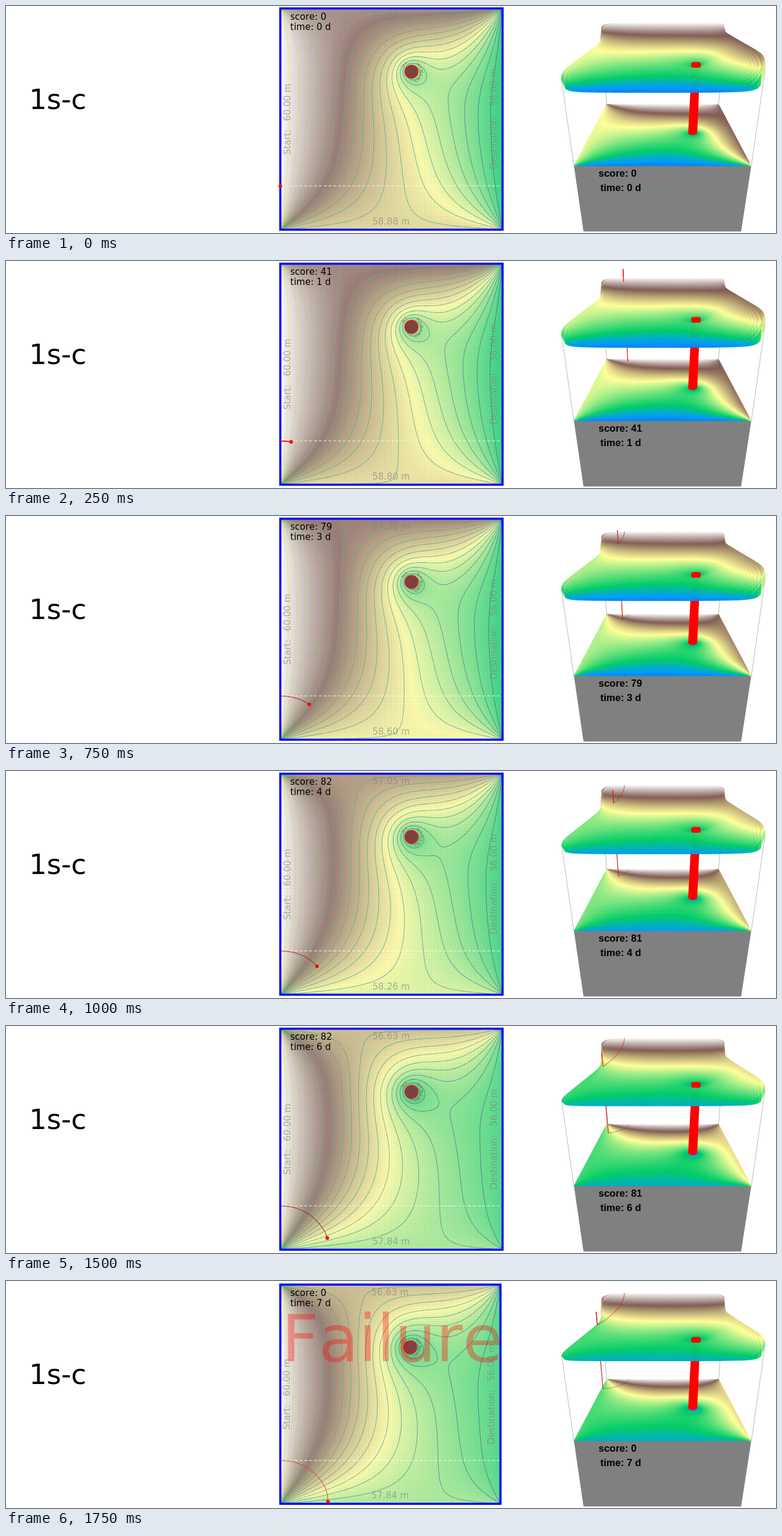
An HTML page with a canvas for the animation above (2000 ms loop, 1280 px wide and 379 px high).

```html
<!DOCTYPE html>
<html lang="en">
<head>
<meta charset="utf-8">
<title>Groundwater path</title>
<style>
  html, body { margin: 0; width: 100%; height: 100%; overflow: hidden; background: #fff; }
  canvas { display: block; }
</style>
</head>
<body>
<canvas id="stage" width="1280" height="379"></canvas>
<script>
const start = performance.now();
const ctx = document.getElementById('stage').getContext('2d');
ctx.fontKerning = 'none';
const SANS = '"DejaVu Sans", Verdana, sans-serif';
const BOLD = 'bold 16.5px "Liberation Sans", Arial, sans-serif';
const N = 80, W = N + 1, MESH = 100;
const WELL = { u: 0.59, v: 0.286, r: 0.03, rate: 3.65 };

// One entry per day: heads at both walls, scores, lift and base colour of the 3D view, tracer position
const days = [
  { north: 58.88, south: 57.67, score: 0,  score3: 0,  lift: 0,     tone: 0.11,  x: 456, y: 300.5 },
  { north: 58.80, south: 57.59, score: 41, score3: 41, lift: 0,     tone: 0.11,  x: 474, y: 302 },
  { north: 58.70, south: 57.48, score: 67, score3: 67, lift: 0.01,  tone: 0.115, x: 490, y: 307 },
  { north: 58.60, south: 57.38, score: 79, score3: 79, lift: 0.02,  tone: 0.12,  x: 504, y: 314.5 },
  { north: 58.26, south: 57.05, score: 82, score3: 81, lift: 0.04,  tone: 0.155, x: 517, y: 326 },
  { north: 57.94, south: 56.73, score: 82, score3: 81, lift: 0.065, tone: 0.175, x: 528, y: 340 },
  { north: 57.84, south: 56.63, score: 82, score3: 81, lift: 0.073, tone: 0.185, x: 534, y: 354 },
  { north: 57.84, south: 56.63, score: 0,  score3: 0,  lift: 0.073, tone: 0.185, x: 536, y: 370 }
];
const stops = days.map(d => [(d.x - 456) / 369.5, (d.y - 4.5) / 369]);

const terrain = [[0, 51, 51, 153], [0.15, 0, 153, 255], [0.25, 0, 204, 102],
  [0.5, 255, 255, 153], [0.75, 128, 92, 84], [1, 255, 255, 255]];
const viridis = [[0, 68, 1, 84], [0.25, 59, 82, 139], [0.5, 33, 145, 140],
  [0.75, 94, 201, 98], [1, 253, 231, 37]];

function ramp(map, t) {
  t = Math.min(1, Math.max(0, t));
  let k = 1;
  while (k < map.length - 1 && t > map[k][0]) k++;
  const a = map[k - 1], b = map[k], f = (t - a[0]) / (b[0] - a[0]);
  return [1, 2, 3].map(c => a[c] + (b[c] - a[c]) * f);
}

// Terrain colour of a head, with `tone` the map position of the lowest wall
const headColor = (head, tone) => ramp(terrain, tone + (head - 56) / 4 * (1 - tone));

// Steady flow: fixed heads on four sides and a pumping well, by over-relaxation
function solve({ north, south }) {
  const h = new Float64Array(W * W).fill(57.5);
  const sink = new Float64Array(W * W);
  let cells = 0;
  for (let j = 0; j < W; j++) {
    h[j * W] = 60;
    h[j * W + N] = 56;
    for (let i = 0; i < W; i++) {
      if (Math.hypot(i / N - WELL.u, j / N - WELL.v) < WELL.r) {
        sink[j * W + i] = WELL.rate / 4;
        cells++;
      }
    }
  }
  for (let i = 0; i < W; i++) {
    h[i] = north;
    h[N * W + i] = south;
  }
  for (let n = 0; n < 260; n++) {
    for (let j = 1; j < N; j++) {
      for (let i = 1; i < N; i++) {
        const k = j * W + i;
        const mean = (h[k - 1] + h[k + 1] + h[k - W] + h[k + W]) / 4 - sink[k] / cells;
        h[k] += 1.925 * (mean - h[k]);
      }
    }
  }
  return h;
}

function sample(h, u, v) {
  const x = Math.min(N, Math.max(0, u * N)), y = Math.min(N, Math.max(0, v * N));
  const i = Math.min(N - 1, Math.floor(x)), j = Math.min(N - 1, Math.floor(y));
  const a = x - i, b = y - j, k = j * W + i;
  return (h[k] * (1 - a) + h[k + 1] * a) * (1 - b) + (h[k + W] * (1 - a) + h[k + W + 1] * a) * b;
}

// Smooth tracer trail up to a given day
function trail(day) {
  const out = [stops[0]];
  for (let k = 0; k < day; k++) {
    const [a, b, c, d] = [k - 1, k, k + 1, k + 2].map(n => stops[Math.min(7, Math.max(0, n))]);
    for (let s = 1; s <= 6; s++) {
      const t = s / 6;
      out.push([0, 1].map(m => b[m] + 0.5 * t * (c[m] - a[m]
        + t * (2 * a[m] - 5 * b[m] + 4 * c[m] - d[m] + t * (3 * (b[m] - c[m]) + d[m] - a[m])))));
    }
  }
  return out;
}

function line(points, color, width) {
  ctx.beginPath();
  points.forEach(p => ctx.lineTo(p[0], p[1]));
  ctx.strokeStyle = color;
  ctx.lineWidth = width;
  ctx.stroke();
}

function poly(points, color) {
  ctx.beginPath();
  points.forEach(p => ctx.lineTo(p[0], p[1]));
  ctx.closePath();
  ctx.fillStyle = color;
  ctx.fill();
}

function disc(x, y, rx, ry, color) {
  ctx.beginPath();
  ctx.ellipse(x, y, rx, ry, 0, 0, 7);
  ctx.fillStyle = color;
  ctx.fill();
}

function text(str, x, y, font, color, align = 'left', turn = 0) {
  ctx.save();
  ctx.translate(x, y);
  ctx.rotate(turn);
  ctx.font = font;
  ctx.fillStyle = color;
  ctx.textAlign = align;
  ctx.fillText(str, 0, 0);
  ctx.restore();
}

const tile = document.createElement('canvas');
tile.width = tile.height = 370;
const tileCtx = tile.getContext('2d');

function paintHeads(h, tone) {
  const img = tileCtx.createImageData(370, 370);
  for (let y = 0, p = 0; y < 370; y++) {
    for (let x = 0; x < 370; x++, p += 4) {
      const c = headColor(sample(h, x / 369, y / 369), tone);
      for (let m = 0; m < 3; m++) img.data[p + m] = 255 - (255 - c[m]) * 0.78;
      img.data[p + 3] = 255;
    }
  }
  tileCtx.putImageData(img, 0, 0);
}

// Marching squares: every cell side crossed by the level gives one end of a segment
function contour(h, level, X, Y) {
  ctx.beginPath();
  for (let j = 0; j < N; j++) {
    for (let i = 0; i < N; i++) {
      const c = [[i, j], [i + 1, j], [i + 1, j + 1], [i, j + 1]];
      const hits = [];
      for (let k = 0; k < 4; k++) {
        const a = c[k], b = c[(k + 1) % 4];
        const ha = h[a[1] * W + a[0]], hb = h[b[1] * W + b[0]];
        if ((ha > level) !== (hb > level)) {
          const f = (level - ha) / (hb - ha);
          hits.push([a[0] + (b[0] - a[0]) * f, a[1] + (b[1] - a[1]) * f]);
        }
      }
      for (let k = 0; k + 1 < hits.length; k += 2) {
        ctx.moveTo(X(hits[k][0] / N), Y(hits[k][1] / N));
        ctx.lineTo(X(hits[k + 1][0] / N), Y(hits[k + 1][1] / N));
      }
    }
  }
  const [r, g, b] = ramp(viridis, (level - 55) / 5);
  ctx.strokeStyle = `rgba(${r},${g},${b},0.55)`;
  ctx.lineWidth = 1.1;
  ctx.stroke();
}

function drawWell(x, y) {
  disc(x, y, 11, 11, 'rgb(112,72,68)');
  for (const r of [4, 7.5, 10.5]) {
    ctx.beginPath();
    ctx.arc(x, y, r, 0, 7);
    ctx.strokeStyle = r > 10 ? 'rgb(215,25,28)' : 'rgba(190,35,35,0.6)';
    ctx.lineWidth = r > 10 ? 2 : 1;
    ctx.stroke();
  }
  for (const a of [-0.7, 0.1, 0.9, 3.9]) {
    text('56.4', x + 15 * Math.cos(a), y + 15 * Math.sin(a), '5px ' + SANS,
      'rgba(215,30,30,0.85)', 'center', a + Math.PI / 2);
  }
}

function drawMap(day, h) {
  const d = days[day], last = day === 7;
  const [x0, y0, x1, y1] = last ? [456, 6, 822, 372] : [456, day ? 4.5 : 4, 825.5, 373.5];
  const X = u => x0 + u * (x1 - x0), Y = v => y0 + v * (y1 - y0);
  const label = '15px ' + SANS, grey = 'rgba(128,128,128,0.6)';

  ctx.save();
  ctx.beginPath();
  ctx.rect(x0, y0, x1 - x0, y1 - y0);
  ctx.clip();
  paintHeads(h, 0.195 + d.tone / 2);
  ctx.drawImage(tile, x0, y0, x1 - x0, y1 - y0);
  for (let k = 1; k < MESH; k++) {
    const s = k / MESH;
    line([[X(s), y0], [X(s), y1]], 'rgba(70,55,65,0.09)', 0.7);
    line([[x0, Y(s)], [x1, Y(s)]], 'rgba(70,55,65,0.09)', 0.7);
  }
  for (let n = 0; n <= 22; n++) contour(h, 55.4 + n * 0.2 + 1e-6, X, Y);
  drawWell(X(WELL.u), Y(WELL.v));
  ctx.setLineDash([5, 3]);
  line([[x0, Y(0.802)], [x1, Y(0.802)]], 'rgba(255,255,255,0.7)', 1.3);
  ctx.setLineDash([]);

  const mid = X(0.4985);
  text(d.south.toFixed(2) + ' m', mid, y0 + 17.5, label, grey, 'center');
  text(d.north.toFixed(2) + ' m', mid, y1 - 9, label, grey, 'center');
  text('Start:   60.00 m', X(0.045), Y(0.5), label, grey, 'center', -Math.PI / 2);
  text('Destination:   56.00 m', X(0.974), Y(0.5), label, grey, 'center', -Math.PI / 2);
  if (last) text('Failure', 458, 134, '108px ' + SANS, 'rgba(255,0,0,0.33)');
  ctx.restore();

  ctx.strokeStyle = '#00f';
  ctx.lineWidth = 3.5;
  ctx.strokeRect(x0, y0, x1 - x0, y1 - y0);

  const path = trail(day).map(p => [X(p[0]), Y(p[1])]);
  line(path, day === 1 ? '#f00' : last ? 'rgba(235,50,40,0.75)' : 'rgba(160,40,25,0.85)', day === 1 ? 1.8 : 1.2);
  const end = path[path.length - 1];
  disc(end[0], end[1], 3, 3, '#f00');

  text('score: ' + d.score, 472.5, y0 + 18.8, label, '#000');
  text(`time: ${day} d`, 472.5, y0 + 35.8, label, '#000');
}

// Perspective: map position (u, v) and height q above the base plane
function project(u, v, q) {
  const w = 0.005376 - 0.001986 * u - 0.0004 * q;
  return [1091.5 + (0.5 - v) / w, (0.8817 + 0.0234 * u - 0.52 * q) / w];
}

// Heads are taken at cell centres, which rounds the corners of the sheet
function drawSheet(h, height, tone) {
  const heads = [], pts = [];
  for (let j = 0; j < W; j++) {
    for (let i = 0; i < W; i++) {
      const head = sample(h, (i + 0.5) / W, (j + 0.5) / W);
      heads.push(head);
      pts.push(project(i / N, j / N, height(head)));
    }
  }
  ctx.lineWidth = 0.7;
  for (let i = 0; i < N; i++) {
    for (let j = 0; j < N; j++) {
      const k = j * W + i;
      const mean = (heads[k] + heads[k + 1] + heads[k + W] + heads[k + W + 1]) / 4;
      const color = `rgb(${headColor(mean, tone).map(Math.round)})`;
      poly([pts[k], pts[k + 1], pts[k + W + 1], pts[k + W]], color);
      ctx.strokeStyle = color;
      ctx.stroke();
    }
  }
}

function drawBlock(day, h) {
  const d = days[day];
  const height = head => 0.895 + d.lift + 0.1357 * (head - 56);
  const path = trail(day), [u, v] = path[path.length - 1];
  const top = height(sample(h, u, v));

  for (const [a, b, q] of [[0, 0, 1], [0, 1, 1], [1, 0, 1.137], [1, 1, 1.03]])
    line([project(a, b, 0), project(a, b, q)], '#a8a8a8', 0.8);
  poly([[944, 266], [1239, 266], [1222, 376.5], [960, 376.5]], '#808080');
  drawSheet(h, () => 0, d.tone);

  if (day) {
    line(path.map(p => project(p[0], p[1], 0)), 'rgba(130,40,30,0.6)', 0.8);
    line([project(u, v, 0), project(u, v, top + 0.2)], '#e01010', 1.2);
  }
  poly([[1134, 212], [1140, 98], [1154, 98], [1149, 212]], '#f00');
  disc(1141.5, 212, 7.3, 3.5, '#f00');

  drawSheet(h, height, d.tone);
  ctx.beginPath();
  ctx.roundRect(1139, 93.5, 16, 9.5, 3.5);
  ctx.fillStyle = '#f00';
  ctx.fill();
  if (day) {
    if (day > 1)
      line(path.map(p => project(p[0], p[1], height(sample(h, p[0], p[1])))), 'rgba(200,25,20,0.8)', 1);
    line([project(u, v, top), project(u, v, top + 0.2)], '#e01010', 1.2);
  }
  text('score: ' + d.score3, 985, 285, BOLD, '#000');
  text(`time: ${day} d`, 988, 309, BOLD, '#000');
}

const fields = days.map(solve);
let shown = -1;

function tick() {
  const day = Math.floor((performance.now() - start) / 250) % 8;
  if (day !== shown) {
    shown = day;
    ctx.fillStyle = '#fff';
    ctx.fillRect(0, 0, 1280, 379);
    text('1s-c', 38.5, 172, '46px ' + SANS, '#000');
    drawMap(day, fields[day]);
    drawBlock(day, fields[day]);
  }
  requestAnimationFrame(tick);
}
tick();
</script>
</body>
</html>
```
